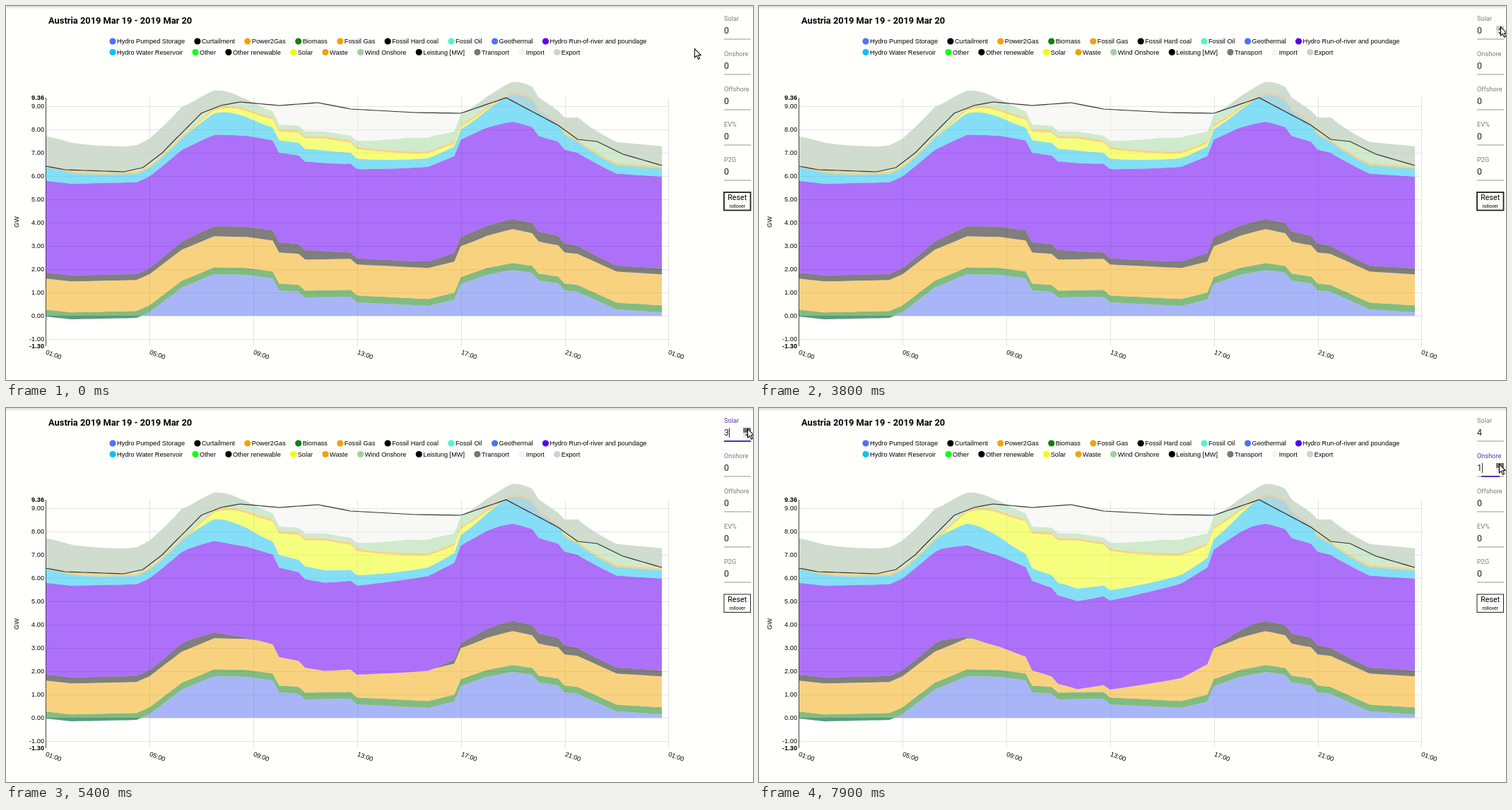
Recreate the animation shown at these times as an HTML page. Size 1057 by 530 pixels, loop 8 s.

```html
<!DOCTYPE html>
<html lang="en">
<head>
<meta charset="utf-8">
<title>Power mix</title>
<style>
  html, body { margin: 0; width: 100%; height: 100%; overflow: hidden; background: #fffffc; }
  svg { display: block; }
  text { font: 9.2px "Liberation Sans", Arial, sans-serif; fill: #000; }
  .bold { font-weight: bold; }
  .ui { font-family: Roboto, sans-serif; }
  .title { font-size: 12.85px; font-weight: bold; }
  .label { fill: #7b7b7b; }
  .value { font-size: 12.4px; fill: #222; }
</style>
</head>
<body>
<svg id="stage" width="1057" height="530" viewBox="0 0 1057 530">
  <defs>
    <linearGradient id="shade" x2="0" y2="1">
      <stop stop-color="#dcdcda"/><stop offset="1" stop-color="#fffffc"/>
    </linearGradient>
  </defs>
  <rect width="1057" height="530" fill="#fffffc"/>
  <rect width="1057" height="5" fill="url(#shade)"/>
</svg>
<script>
const LOOP = 8000, STEP = 100, COUNT = 96, LEFT = 56, ZERO = 439, UNIT = 33;
const ACCENT = '#5b2cb5', GRID = '#e2e2e0';
const stage = document.getElementById('stage');

function add(tag, attrs, text, parent = stage) {
  const node = document.createElementNS('http://www.w3.org/2000/svg', tag);
  set(node, attrs);
  if (text !== undefined) node.textContent = text;
  parent.appendChild(node);
  return node;
}
function set(node, attrs) { for (const key in attrs) node.setAttribute(key, attrs[key]); }
const show = (node, on) => node.setAttribute('visibility', on ? 'visible' : 'hidden');
const rule = (x1, y1, x2, y2, stroke) => add('line', { x1, y1, x2, y2, stroke });
const within = (t, from, to) => t >= from && t < to;
const clamp = v => Math.min(1, Math.max(0, v));
const ramp = (t, from, to) => clamp((t - from) / (to - from));
const smooth = u => u * u * (3 - 2 * u);

// Daily profiles in pixels, one sample per quarter hour
const sample = fn => Array.from({ length: COUNT }, (_, i) => fn(i));
const bump = (i, center, width, power = 2) => Math.exp(-Math.pow(Math.abs(i - center) / width, power));
function through(points) {
  const keys = points.split(' ').map(pair => pair.split(',').map(Number));
  return sample(i => {
    const k = Math.max(1, keys.findIndex(key => key[0] >= i));
    const [a, b] = [keys[k - 1], keys[k]];
    return a[1] + (b[1] - a[1]) * (i - a[0]) / (b[0] - a[0]);
  });
}
const plus = (a, b) => a.map((v, i) => v + b[i]);
const minus = (a, b) => a.map((v, i) => v - b[i]);
const upper = (a, b) => a.map((v, i) => Math.min(v, b[i]));
const excess = (a, b) => a.map((v, i) => Math.max(0, v - b[i]));

const pumped = through('0,440 4,444 14,442 16,434 21,399 26,380 31,381 35,386 36,403 39,405 40,413 47,412 ' +
  '48,420 59,425 63,416 64,394 68,381 72,374 75,378 76,389 79,393 80,403 82,405 88,430 95,434');
const load = through('0,227 3,232 12,235 15,229 18,208 20,189 24,152 27,141 30,136 36,141 42,137 47,146 ' +
  '57,151 64,152 71,130 79,169 82,189 85,192 89,210 95,226');
const wind = through('0,41 12,36 21,41 26,25 30,15 36,7 47,7 56,19 60,19 63,14 79,16 82,31 95,28');
const sun = through('0,0 22,0 29,21 36,37 43,51 70,0 95,0');
const biomass = sample(() => 9.7);
const gas = sample(i => 44 + 4 * bump(i, 72, 4));
const curtailed = sample(i => 8.5 + 6 * bump(i, 32, 12, 4) + 6 * bump(i, 72, 11, 4));
const river = sample(i => 130 - 5 * bump(i, 43, 10) + 9 * bump(i, 68, 11));
const reservoir = sample(i => 12 + 7 * bump(i, 0, 5) + 20 * bump(i, 27.5, 5.5) +
  6 * bump(i, 41, 8) + 28 * bump(i, 73.5, 6.2));
const waste = sample(() => 3);

const line = ys => ys.map((y, i) => `${(LEFT + i * 9.18).toFixed(1)} ${y.toFixed(1)}`);
const area = (top, bottom) => `M${line(top).concat(line(bottom).reverse()).join('L')}Z`;

// Extra sun displaces curtailment first, then gas
function stackTops(level) {
  const extra = sun.map(s => s * level / 4);
  const bands = [
    biomass,
    excess(gas, excess(extra, curtailed)),
    excess(curtailed, extra),
    river, reservoir,
    plus(sun.map(s => s / 3), extra),
    waste, wind
  ];
  const tops = [pumped];
  for (const band of bands) tops.push(minus(tops[tops.length - 1], band));
  return tops;
}

// Title and legend
add('text', { x: 60, y: 25, class: 'ui title' }, 'Austria 2019 Mar 19 - 2019 Mar 20');
const BLUE = '#4e73f4', ORANGE = '#f0a30a', BLACK = '#000';
const legend = [
  [['Hydro Pumped Storage', BLUE], ['Curtailment', BLACK], ['Power2Gas', ORANGE], ['Biomass', '#108010'],
    ['Fossil Gas', ORANGE], ['Fossil Hard coal', BLACK], ['Fossil Oil', '#4ff5d0'], ['Geothermal', BLUE],
    ['Hydro Run-of-river and poundage', '#5a00f0']],
  [['Hydro Water Reservoir', '#10c0f5'], ['Other', '#10ff10'], ['Other renewable', BLACK], ['Solar', '#f0ff00'],
    ['Waste', ORANGE], ['Wind Onshore', '#a0d0a0'], ['Leistung [MW]', BLACK], ['Transport', '#777'],
    ['Import', '#f4f4f4'], ['Export', '#d0d0d0']]
];
legend.forEach((items, row) => {
  const y = 50 + 15.5 * row;
  let x = 151;
  for (const [name, fill] of items) {
    add('circle', { cx: x, cy: y, r: 4.6, fill });
    x += 23.9 + add('text', { x: x + 6, y: y + 3.3 }, name).getComputedTextLength();
  }
});

// Grid and axes
const tick = (y, text, style) => add('text', { x: 54, y: y + 3.4, 'text-anchor': 'end', class: style }, text);
for (let gw = -1; gw <= 9; gw++) {
  const y = ZERO - gw * UNIT;
  rule(LEFT, y + .5, 937, y + .5, GRID);
  tick(y, gw.toFixed(2), '');
}
tick(130, '9.36', 'bold');
tick(482, '-1.30', 'bold');
for (let k = 0; k <= 6; k++) {
  const x = Math.round(LEFT + k * 146.9);
  if (k) rule(x + .5, 130, x + .5, 482, GRID);
  const hour = String((1 + 4 * k) % 24).padStart(2, '0');
  add('text', { transform: `translate(${x - .5} 493) rotate(20)` }, hour + ':00');
}
add('text', { transform: 'translate(17.5 306) rotate(-90)', 'text-anchor': 'middle' }, 'GW');

// Chart
const layers = ['#647df6', '#208820', '#f5af20', '#1b1b1b', '#6d00f8', '#25c6f3', '#eeff1c', '#f5af20', '#abdaab']
  .map(fill => add('path', { fill, 'fill-opacity': .56 }));
const sky = stackTops(0).pop();
const crest = upper(sky, load);
add('path', { d: area(crest, sky), fill: '#f2f2f2', 'fill-opacity': .5 });
add('path', { d: area(crest, load), fill: '#d0d0d0', 'fill-opacity': .5 });
add('path', { d: 'M' + line(load).join('L'), fill: 'none', stroke: '#333', 'stroke-width': 1.2 });
rule(LEFT + .5, 130, LEFT + .5, 482, '#444');

function drawStack(level) {
  let base = sample(() => ZERO);
  stackTops(level).forEach((top, i) => {
    layers[i].setAttribute('d', area(top, base));
    base = top;
  });
}

// Input panel
const fields = ['Solar', 'Onshore', 'Offshore', 'EV%', 'P2G'].map((name, i) => {
  const y = 50 * i;
  const label = add('text', { x: 1016, y: y + 20.5, class: 'ui label' }, name);
  const value = add('text', { x: 1016, y: y + 39, class: 'ui value' }, '0');
  rule(1016, y + 47, 1054, y + 47, '#959595');
  const bar = add('rect', { y: y + 46, height: 2, fill: ACCENT });
  const caret = add('rect', { x: 1023, y: y + 28, width: 1, height: 14, fill: '#333' });
  const spinner = add('g', { transform: `translate(1043 ${y + 28})` });
  add('rect', { width: 11, height: 14, fill: '#e8e8e8' }, undefined, spinner);
  const half = add('rect', { width: 11, height: 7 }, undefined, spinner);
  add('path', { d: 'M3 5.5L5.5 2.5 8 5.5ZM3 9L5.5 12 8 9Z', fill: '#444' }, undefined, spinner);
  for (const part of [bar, caret, spinner]) show(part, false);
  return { label, value, bar, caret, spinner, half };
});
const button = add('rect', { x: 1016, y: 264, width: 37.5, height: 25.5, fill: 'none', stroke: '#222' });
const caption = (y, size, text) =>
  add('text', { x: 1034.7, y, class: 'ui', 'text-anchor': 'middle', style: `font-size:${size}px` }, text);
caption(274.6, 10.7, 'Reset');
caption(285.7, 6.8, 'rollover');

function tooltip(y, height, letters) {
  const group = add('g', {});
  add('rect', { x: 1047, y, width: 12, height, fill: '#0a0a0a' }, undefined, group);
  letters.forEach((c, i) =>
    add('text', { x: 1053, y: y + 11.5 + 15.5 * i, style: 'fill:#fff' }, c, group));
  return group;
}
const solarTip = tooltip(43, 31, ['A', 'P']);
const onshoreTip = tooltip(93, 21, ['A']);
const pointer = add('path', {
  d: 'M.5 .5V13L3.4 10.4 5.5 15.3 7.6 14.4 5.5 9.6H9.3Z', fill: '#fff', stroke: '#111', 'stroke-width': 1.1
});

// Motion
const solarClicks = [4000, 4800, 5400, 6000], onshoreClicks = [7900];

function drawField(field, t, clicks, focusEnd, hovered, caretOn) {
  const focused = within(t, clicks[0], focusEnd);
  const pressed = clicks.some(c => within(t, c, c + 200));
  const width = 38 * clamp(.68 + (t - clicks[0]) / 600);
  field.label.style.fill = focused ? ACCENT : '';
  field.value.textContent = clicks.filter(c => t >= c).length;
  set(field.bar, { x: 1035 - width / 2, width });
  show(field.bar, focused);
  show(field.caret, focused && caretOn);
  show(field.spinner, focused || hovered);
  field.half.setAttribute('fill', pressed ? '#777' : hovered ? '#cfcfcf' : '#e8e8e8');
}

function draw(t) {
  drawStack(solarClicks.reduce((sum, c) => sum + smooth(ramp(t, c + 200, c + 650)), 0));
  drawField(fields[0], t, solarClicks, 7900, within(t, 1300, 6500), t < 6600 || within(t, 7100, 7600));
  drawField(fields[1], t, onshoreClicks, LOOP, t >= 7100, true);
  show(solarTip, within(t, 1500, 3800));
  show(onshoreTip, within(t, 7200, 7900));
  button.setAttribute('stroke-width', t < solarClicks[0] ? 1.8 : 1);
  const reach = smooth(ramp(t, 600, 1500)), drop = smooth(ramp(t, 6250, 6950));
  pointer.setAttribute('transform', `translate(${974 + 75 * reach - 2 * drop} ${60 - 31 * reach + 50 * drop})`);
}

const start = performance.now();
let last = -1;
function frame() {
  const t = Math.floor((performance.now() - start) % LOOP / STEP) * STEP;
  if (t !== last) draw(last = t);
  requestAnimationFrame(frame);
}
frame();
</script>
</body>
</html>
```
